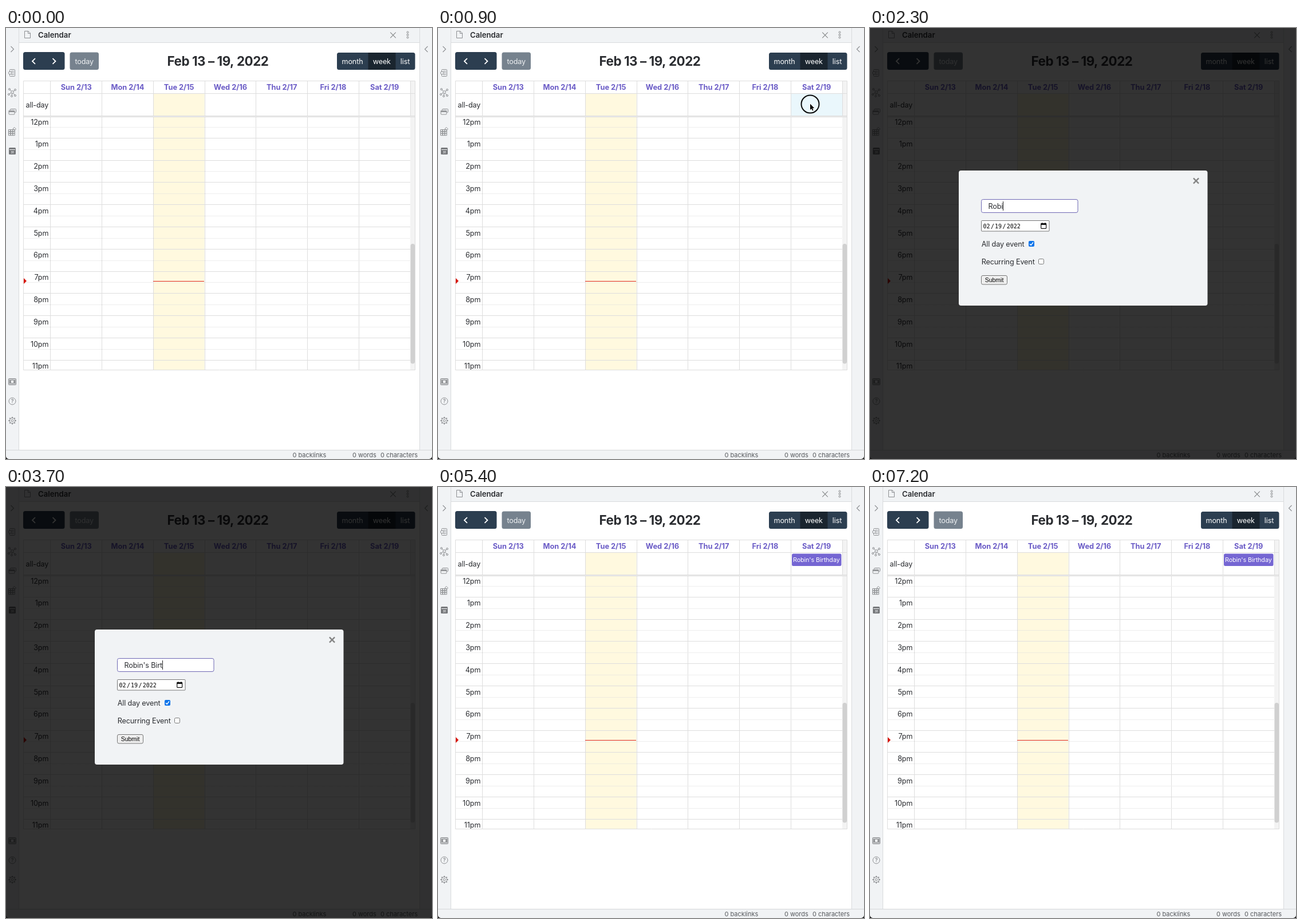
These frames come from a looping animation (744 px wide and 753 px high, 7530 ms). An HTML page with a canvas:

```html
<!DOCTYPE html>
<html lang="en">
<head>
<meta charset="utf-8">
<title>Calendar</title>
<style>
  html, body { margin: 0; width: 100%; height: 100%; overflow: hidden; background: #fff; }
  canvas { display: block; }
</style>
</head>
<body>
<canvas id="stage" width="744" height="753"></canvas>
<script>
const ctx = document.getElementById('stage').getContext('2d');
const W = 744, H = 753, LOOP = 7530;
const INTER = 'Inter, sans-serif';
const INK = '#2b2d31', NAVY = '#2c3e50', PANEL = '#f1f3f5', LINE = '#dddddd', ICON = '#8d8f92';
const EVENT = "Robin's Birthday";
const MODAL_OPEN = 1000, MODAL_CLOSE = 5400;
const DAYS = ['Sun', 'Mon', 'Tue', 'Wed', 'Thu', 'Fri', 'Sat'];
// Time at which each letter of the title is typed
const KEYS = [1900, 2100, 2200, 2300, 2400, 2500, 2700, 3100, 3200, 3300, 3600, 3700, 3800, 3900, 4000, 4100];
const colX = i => 78 + i * 89.75;

function rect(x, y, w, h, fill) {
  ctx.fillStyle = fill;
  ctx.fillRect(x, y, w, h);
}

function box(x, y, w, h, r, fill, stroke, lw = 1) {
  ctx.beginPath();
  ctx.roundRect(x, y, w, h, r);
  if (fill) { ctx.fillStyle = fill; ctx.fill(); }
  if (stroke) { ctx.strokeStyle = stroke; ctx.lineWidth = lw; ctx.stroke(); }
}

function path(points, color, lw = 1, close = false) {
  ctx.beginPath();
  points.forEach(([x, y]) => ctx.lineTo(x, y));
  if (close) ctx.closePath();
  ctx.strokeStyle = color;
  ctx.lineWidth = lw;
  ctx.stroke();
}

function circle(x, y, r, fill, stroke, lw = 1) {
  ctx.beginPath();
  ctx.arc(x, y, r, 0, Math.PI * 2);
  if (fill) { ctx.fillStyle = fill; ctx.fill(); }
  if (stroke) { ctx.strokeStyle = stroke; ctx.lineWidth = lw; ctx.stroke(); }
}

// y is the middle of the capitals
function text(str, x, y, { size = 12.6, weight = 400, color = INK, align = 'left', gap = -0.12, family = INTER } = {}) {
  ctx.font = `${weight} ${size}px ${family}`;
  ctx.letterSpacing = gap + 'px';
  ctx.textAlign = align;
  ctx.fillStyle = color;
  ctx.fillText(str, x, y + size * 0.36);
  return ctx.measureText(str).width;
}

function chevron(x, y, w, h, color, lw) {
  path([[x - w, y - h], [x + w, y], [x - w, y + h]], color, lw);
}

function cross(x, y, r, color, lw) {
  path([[x - r, y - r], [x + r, y + r]], color, lw);
  path([[x + r, y - r], [x - r, y + r]], color, lw);
}

function drawSideIcons() {
  chevron(11, 37, 2.5, 5, ICON, 1.1);
  chevron(734, 37, -2.5, 5, ICON, 1.1);

  // journal
  box(6.5, 72.5, 9, 12, 1, null, ICON);
  for (const y of [75.5, 78.5, 81.5]) path([[9, y], [14, y]], ICON);
  box(4.5, 76.5, 5, 4, 1, PANEL, ICON);

  // graph
  for (const [x, y] of [[6, 107], [16, 108], [5, 116], [16, 118], [10, 119]]) {
    path([[11, 112], [x, y]], ICON);
    circle(x, y, 1.5, PANEL, ICON);
  }
  circle(11, 112, 2.3, PANEL, ICON);

  // cards
  box(7.5, 141.5, 10, 6, 1, null, ICON);
  box(5, 144, 10, 7, 1, PANEL, ICON);
  rect(5, 145, 10, 2, ICON);

  // tiles
  for (let r = 0; r < 3; r++)
    for (let c = 0; c < 3; c++) box(4.5 + c * 3.6, 177.5 + r * 3.4, 3.6, 3.4, 0, null, ICON);
  path([[12, 176], [14.5, 173.5], [17.5, 176.5], [15, 179]], ICON, 1, true);

  // calendar
  box(5, 209, 12, 12, 1.5, '#77797c');
  rect(6, 212, 10, 1, PANEL);
  text('31', 11, 217, { size: 5, weight: 700, color: PANEL, align: 'center' });

  // keyboard panel
  box(4.5, 612.5, 13, 11, 1, '#c5c7c9', ICON);
  circle(11, 618, 3, PANEL, ICON);
  rect(6, 615, 2, 6, ICON);
  rect(14, 615, 2, 6, ICON);

  // help
  circle(11, 652, 6, null, ICON);
  text('?', 11, 652, { size: 9, color: '#77797c', align: 'center', weight: 500 });

  // settings
  for (let i = 0; i < 8; i++) {
    const a = i * Math.PI / 4, c = Math.cos(a), s = Math.sin(a);
    path([[11 + 4.5 * c, 686 + 4.5 * s], [11 + 6.6 * c, 686 + 6.6 * s]], ICON, 2);
  }
  circle(11, 686, 4.7, PANEL, ICON);
  circle(11, 686, 2, null, ICON);
}

function drawFrame() {
  rect(0, 0, W, H, PANEL);
  rect(23, 26, 699, 711, '#fff');
  rect(22, 25, 701, 1, '#d9dbdd');
  rect(22, 0, 1, 737, '#d9dbdd');
  rect(722, 0, 1, 737, '#d9dbdd');
  rect(0, 737, W, 1, '#d5d7d9');

  path([[32.5, 5.5], [39, 5.5], [42.5, 9], [42.5, 17.5], [32.5, 17.5]], ICON, 1, true);
  path([[38.5, 5.5], [38.5, 9.5], [42.5, 9.5]], ICON);
  text('Calendar', 56, 12, { size: 13.2, weight: 600, gap: 0 });
  cross(676, 12.5, 4.8, '#858789', 1.1);
  for (const y of [7.5, 12, 16.5]) circle(701.5, y, 1.5, null, '#858789');

  drawSideIcons();
  const status = { size: 11, color: '#55585c', gap: -0.03 };
  text('0 backlinks', 500.5, 746, status);
  text('0 words', 605, 746, status);
  text('0 characters', 654, 746, status);
}

function drawToolbar() {
  box(30, 42, 72.5, 31, 3.5, NAVY);
  chevron(48.5, 58, -2.5, 4.8, '#fff', 1.8);
  chevron(84, 58, 2.5, 4.8, '#fff', 1.8);
  box(111.5, 42.5, 50.5, 30.5, 3.5, '#76828e');
  box(578, 43, 136.5, 30, 3.5, NAVY);
  rect(632.5, 43, 48, 30, '#1a252f');
  const label = { color: '#fff', align: 'center' };
  text('today', 136.7, 58, { ...label, color: '#eef0f2' });
  text('month', 605, 58, label);
  text('week', 656.3, 58, label);
  text('list', 697, 58, label);
  text('Feb 13 – 19, 2022', 370, 57.5, { size: 22.4, weight: 700, align: 'center', gap: -0.47 });
}

function drawGrid(selecting) {
  rect(257, 115, 89.5, 483, '#fff9df');
  if (selecting) rect(617, 115, 89, 38, '#eaf7fc');
  rect(706, 92, 8.5, 506, '#f3f3f3');

  ctx.save();
  ctx.beginPath();
  ctx.rect(30, 155, 676, 443);
  ctx.clip();
  for (let h = 0; h < 12; h++) {
    const top = 153.7 + h * 38.8;
    if (h) rect(30, Math.round(top - 0.6), 676, 1, LINE);
    ctx.setLineDash([1, 1]);
    const half = Math.round(top + 19) + 0.5;
    path([[30, half], [706, half]], LINE);
    ctx.setLineDash([]);
    text((h || 12) + 'pm', 74.3, 164 + h * 38.8, { align: 'right' });
  }
  ctx.restore();

  rect(30, 114, 684, 1, LINE);
  rect(30, 153, 684, 3, '#ededed');
  rect(30, 153, 684, 1, LINE);
  rect(30, 155, 684, 1, LINE);
  for (let i = 0; i < 8; i++) {
    const x = Math.round(colX(i) - 0.6);
    rect(x, 92, 1, 61, LINE);
    if (i < 7) rect(x, 156, 1, 442, LINE);
  }
  box(30.5, 92.5, 684, 505, 0, null, LINE);

  DAYS.forEach((day, i) => text(`${day} 2/${13 + i}`, colX(i) + 44.7, 103.5,
    { size: 12.8, weight: 700, color: '#6a5bc6', align: 'center', gap: 0 }));
  text('all-day', 74.3, 134.5, { align: 'right' });

  box(706.5, 377, 7.5, 209.5, 3.7, '#d0d0d0');
  rect(257, 442, 89, 1, '#e02a20');
  ctx.beginPath();
  ctx.moveTo(31, 437);
  ctx.lineTo(36, 442);
  ctx.lineTo(31, 447);
  ctx.fillStyle = '#d8160c';
  ctx.fill();
}

function drawEvent() {
  box(618, 116.5, 86.5, 21.5, 2.5, '#7566d3');
  text(EVENT, 620, 127.5, { size: 10.8, color: '#fff', gap: -0.1 });
}

function drawModal(t) {
  rect(0, 0, W, H, 'rgba(0,0,0,.8)');
  box(155, 249, 434.5, 236, 4, PANEL);
  cross(569.5, 267, 4.6, '#858585', 2.4);

  box(194.5, 299.5, 168.5, 23, 3, '#fff', '#6f68b4');
  const typed = EVENT.slice(0, KEYS.filter(k => k <= t).length);
  const width = typed ? text(typed, 206.5, 311.5) : 0;
  if (!typed) text('Add title', 206.5, 311.5, { color: '#8c8c8c' });
  const blinkOff = (t >= 1500 && t < 1900) || (t >= 4500 && t < 5000);
  if (!blinkOff) rect(Math.round(206 + width), 303, 1, 16, '#222');

  box(194.5, 336.5, 118.5, 18.5, 1, '#fff', '#767676');
  const mono = { size: 10, color: '#000', gap: 0, family: '"DejaVu Sans Mono", monospace' };
  [['02', 197.5], ['/', 211], ['19', 218], ['/', 231.5], ['2022', 238.7]]
    .forEach(([part, x]) => text(part, x, 346, mono));
  box(298.7, 341.7, 9, 8.6, 1, null, '#111', 1.2);
  rect(298.5, 341, 9.5, 3, '#111');
  rect(300, 340, 1.2, 2, '#111');
  rect(305.2, 340, 1.2, 2, '#111');

  text('All day event', 194.7, 377.5);
  box(277, 372, 10, 10, 2, '#0b74ea');
  path([[279, 377.2], [281.2, 379.4], [285, 374.4]], '#fff', 1.5);
  text('Recurring Event', 194.7, 408.5);
  box(294.5, 403.5, 9, 9, 2, '#fff', '#767676');

  box(194.5, 432.5, 45, 15.5, 2.5, '#efefef', '#767676');
  text('Submit', 217, 440.3, { size: 10.5, color: '#000', align: 'center', gap: 0, family: '"Liberation Sans", Arial, sans-serif' });
}

function drawPointer(t) {
  const p = Math.min(1, t / 600);
  const rest = (1 - p) ** 2;
  const x = 650 + 55 * rest, y = 132.5 + 640 * rest;
  ctx.beginPath();
  for (const [dx, dy] of [[0, 0], [0, 10.5], [2.4, 8.4], [4, 12], [5.6, 11.2], [4.1, 7.8], [7.2, 7.6]])
    ctx.lineTo(x + dx, y + dy);
  ctx.closePath();
  ctx.lineJoin = 'round';
  ctx.strokeStyle = '#fff';
  ctx.lineWidth = 1.8;
  ctx.stroke();
  ctx.fillStyle = '#000';
  ctx.fill();
  ctx.lineJoin = 'miter';
}

function drawCorners() {
  ctx.beginPath();
  ctx.rect(0, H - 5, W, 5);
  ctx.roundRect(0, H - 20, W, 20, [0, 0, 5, 5]);
  ctx.save();
  ctx.clip('evenodd');
  rect(0, H - 5, 5, 5, '#111');
  rect(W - 5, H - 5, 5, 5, '#111');
  ctx.restore();
  // the even-odd clip leaves only the area outside the rounded edge
}

function draw(ms) {
  const t = Math.floor(ms / 100) * 100;
  const clicking = t === 900;
  drawFrame();
  drawToolbar();
  drawGrid(clicking);
  if (t >= MODAL_CLOSE) drawEvent();
  if (t >= MODAL_OPEN && t < MODAL_CLOSE) drawModal(t);
  if (clicking) circle(650, 133, 15.5, null, '#0a0a0a', 2);
  if (t >= 100 && t < KEYS[0]) drawPointer(t);
  drawCorners();
}

const start = performance.now();
function tick() {
  draw((performance.now() - start) % LOOP);
  requestAnimationFrame(tick);
}
tick();
</script>
</body>
</html>
```
